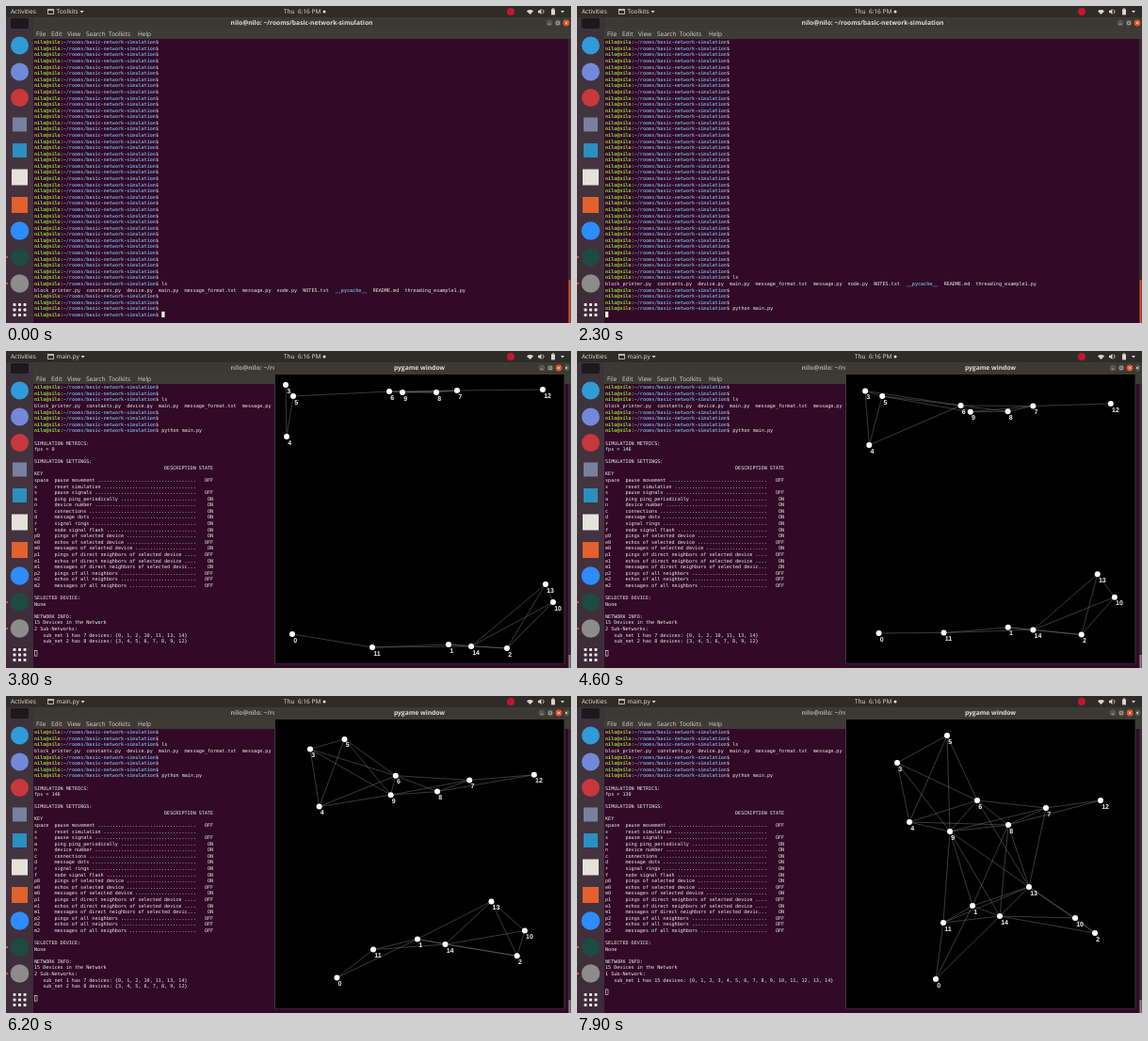
An HTML page with a canvas that plays this animation: 600 by 337 pixels, repeating every 8 s.

```html
<!DOCTYPE html>
<html lang="en">
<head>
<meta charset="utf-8">
<title>Network simulation</title>
<style>
  html, body { margin: 0; width: 100%; height: 100%; overflow: hidden; background: #300a24; }
  canvas { display: block; width: 600px; height: 337px; }
</style>
</head>
<body>
<canvas id="stage"></canvas>
<script>
const LOOP = 8000, WINDOW_AT = 3000, SIM_AT = 3300, ENTER_AT = 2100;
const canvas = document.getElementById('stage');
const ctx = canvas.getContext('2d');
const ratio = window.devicePixelRatio || 1;
canvas.width = 600 * ratio;
canvas.height = 337 * ratio;

const MONO = '"DejaVu Sans Mono", monospace';
const SANS = '"Open Sans", "Noto Sans", sans-serif';
const LABEL = 'bold 7px "Liberation Sans", sans-serif';
const COL = 3.074, ROW = 6.58, LEFT = 30, TOP = 38.4;
const WHITE = '#eeeeec', GREEN = '#8ae234', BLUE = '#729fcf';
const USER = 'nilo@nilo', PATH = '~/rooms/basic-network-simulation';

// Typed command: time and characters visible from then on
const COMMAND = 'python main.py';
const TYPING = [[300, 1], [400, 2], [500, 3], [600, 4], [700, 5], [800, 6], [900, 7],
  [1300, 8], [1400, 9], [1500, 10], [1600, 11], [1700, 14]];
const FPS = [[0, 0], [4300, 146], [6300, 130]];

const SETTINGS = [
  ['space', 'pause movement', 'OFF'], ['x', 'reset simulation', ''],
  ['s', 'pause signals', 'OFF'], ['a', 'ping ping_periodically', 'ON'],
  ['n', 'device number', 'ON'], ['c', 'connections', 'ON'],
  ['d', 'message dots', 'ON'], ['r', 'signal rings', 'ON'],
  ['f', 'node signal flash', 'ON'], ['p0', 'pings of selected device', 'ON'],
  ['e0', 'echos of selected device', 'OFF'], ['m0', 'messages of selected device', 'ON'],
  ['p1', 'pings of direct neighbors of selected device', 'OFF'],
  ['e1', 'echos of direct neighbors of selected device', 'ON'],
  ['m1', 'messages of direct neighbors of selected devic...', 'ON'],
  ['p2', 'pings of all neighbors', 'OFF'], ['e2', 'echos of all neighbors', 'OFF'],
  ['m2', 'messages of all neighbors', 'OFF']
];

// Device paths: x, y at each of the four times
const TIMES = [3800, 5300, 7000, 7900];
const PATHS = [
  [304, 301, 335, 299, 366, 300, 381, 301],
  [470, 312, 447, 278, 428, 241, 420, 223],
  [532, 316, 539, 289, 546, 265, 550, 252],
  [297, 36, 314, 48, 331, 64, 340, 71],
  [298, 91, 321, 108, 343, 126, 353, 134],
  [305, 48, 341, 48, 376, 44, 393, 42],
  [407, 43, 408, 71, 419, 97, 425, 111],
  [479, 42, 489, 73, 495, 104, 498, 119],
  [457, 44, 458, 82, 458, 119, 458, 137],
  [421, 44, 415, 83, 403, 125, 396, 144],
  [581, 267, 562, 257, 541, 243, 529, 236],
  [389, 315, 390, 286, 390, 255, 389, 241],
  [570, 41, 564, 69, 558, 97, 556, 111],
  [573, 248, 535, 228, 498, 210, 480, 203],
  [494, 314, 476, 281, 458, 249, 449, 234]
];
const RANGE = 108;

const stepAt = (table, t, start) => table.reduce((v, [at, next]) => t >= at ? next : v, start);

function rect(x, y, w, h, color) {
  ctx.fillStyle = color;
  ctx.fillRect(x, y, w, h);
}

function box(x, y, w, h, r, color) {
  ctx.fillStyle = color;
  ctx.beginPath();
  ctx.roundRect(x, y, w, h, r);
  ctx.fill();
}

function disc(x, y, r, color) {
  ctx.fillStyle = color;
  ctx.beginPath();
  ctx.arc(x, y, r, 0, Math.PI * 2);
  ctx.fill();
}

function poly(points, color) {
  ctx.fillStyle = color;
  ctx.beginPath();
  points.forEach(([x, y]) => ctx.lineTo(x, y));
  ctx.fill();
}

function line(points, color, width) {
  ctx.strokeStyle = color;
  ctx.lineWidth = width;
  ctx.beginPath();
  points.forEach(([x, y]) => ctx.lineTo(x, y));
  ctx.stroke();
}

function text(str, x, y, font, color, align = 'left') {
  ctx.font = font;
  ctx.fillStyle = color;
  ctx.textAlign = align;
  ctx.fillText(str, x, y);
}

// --- Devices ---

function devicesAt(t) {
  let k = 0;
  while (k < 2 && t > TIMES[k + 1]) k++;
  const f = (t - TIMES[k]) / (TIMES[k + 1] - TIMES[k]);
  const mix = (p, i) => p[i] + (p[i + 2] - p[i]) * f;
  return PATHS.map(p => [mix(p, 2 * k), mix(p, 2 * k + 1)]);
}

function linksOf(devices) {
  const links = [];
  devices.forEach((a, i) => devices.forEach((b, j) => {
    if (i < j && Math.hypot(a[0] - b[0], a[1] - b[1]) < RANGE) links.push([i, j]);
  }));
  return links;
}

function groupsOf(count, links) {
  const group = Array.from({ length: count }, (_, i) => i);
  links.forEach(([i, j]) => {
    const from = group[j], to = group[i];
    group.forEach((g, n) => { if (g === from) group[n] = to; });
  });
  return [...new Set(group)].map(g => [...group.keys()].filter(n => group[n] === g));
}

// --- Shell: each row is a list of [column, string, colour, weight] ---

const plain = str => [[0, str, WHITE, '']];
const prompt = (cmd = '') => [
  [0, USER, GREEN, 'bold '], [9, ':', WHITE, ''], [10, PATH, BLUE, 'bold '],
  [42, '$ ' + cmd, WHITE, '']
];
const FILES = 'block_printer.py  constants.py  device.py  main.py  message_format.txt  ' +
  'message.py  node.py  NOTES.txt  ';
const listing = [
  [0, FILES, WHITE, ''], [FILES.length, '__pycache__', BLUE, 'bold '],
  [FILES.length + 13, 'README.md  threading_example1.py', WHITE, '']
];
const HISTORY = [
  ...Array.from({ length: 39 }, () => prompt()), prompt('ls'), listing,
  prompt(), prompt(), prompt()
];

function report(t, groups) {
  const dotted = ([key, what, state]) =>
    key.padEnd(7) + (what.length < 49 ? what + ' ' : what).padEnd(49, '.') + state.padStart(6);
  return [
    '', 'SIMULATION METRICS:', 'fps = ' + stepAt(FPS, t, 0), '',
    'SIMULATION SETTINGS:', ' '.repeat(45) + 'DESCRIPTION STATE', 'KEY',
    ...SETTINGS.map(dotted), '',
    'SELECTED DEVICE:', 'None', '',
    'NETWORK INFO:', '15 Devices in the Network',
    groups.length + (groups.length > 1 ? ' Sub-Networks:' : ' Sub-Network:'),
    ...groups.map((g, i) => `   sub_net ${i + 1} has ${g.length} devices: {${g.join(', ')}}`),
    ''
  ].map(plain);
}

function drawShell(t, groups) {
  rect(29, 35, 571, 302, '#320a28');
  const typed = COMMAND.slice(0, stepAt(TYPING, t, 0));
  let rows = [...HISTORY, prompt(typed)];
  let column = 44 + typed.length, cursorRow = 44;
  if (t >= SIM_AT) {
    rows = [...rows.slice(37), ...report(t, groups)];
    cursorRow = rows.length;
    column = 0;
  } else if (t >= ENTER_AT) {
    rows = rows.slice(1);
    column = 0;
  }
  rows.forEach((row, i) => row.forEach(([col, str, color, weight]) =>
    text(str, LEFT + col * COL, TOP + i * ROW + 1.9, `${weight}5.1px ${MONO}`, color)));

  const x = LEFT + column * COL, y = TOP + cursorRow * ROW - 3.1;
  if (t >= WINDOW_AT) {
    ctx.strokeStyle = WHITE;
    ctx.lineWidth = 0.6;
    ctx.strokeRect(x + 0.3, y + 0.3, 2.7, 5.6);
  } else {
    rect(x, y, 3.3, 6.2, WHITE);
  }
  rect(597, 35, 3, 302, '#3a2733');
  if (t < SIM_AT) rect(597.5, 291, 2, 46, '#d4552a');
  else rect(597.5, 323, 2, 14, '#8d8788');
}

function drawButtons(x, close) {
  [0, 9, 18].forEach((dx, i) => disc(x + dx, 18, 3.4, i === 2 ? close : '#56534c'));
  line([[x - 1.4, 19.2], [x + 1.4, 19.2]], '#c9c5bb', 0.7);
  ctx.strokeStyle = '#c9c5bb';
  ctx.strokeRect(x + 7.7, 16.8, 2.6, 2.6);
  line([[x + 16.7, 16.7], [x + 19.3, 19.3]], '#eee', 0.7);
  line([[x + 19.3, 16.7], [x + 16.7, 19.3]], '#eee', 0.7);
}

function drawFrame(active) {
  rect(29, 12, 571, 12, '#3b3934');
  text(`${USER}: ${PATH}`, 314, 20.3, `bold 6.7px ${SANS}`, active ? '#dfdbd2' : '#aaa69d', 'center');
  drawButtons(577, active ? '#e2542a' : '#56534c');
  rect(29, 24, 571, 11, '#3d3b36');
  [['File', 32], ['Edit', 48], ['View', 65], ['Search', 85], ['Toolkits', 109], ['Help', 140]]
    .forEach(([name, x]) => text(name, x, 32.2, `6.5px ${SANS}`, '#d8d4cb'));
}

// --- Desktop ---

function drawTopBar(app) {
  rect(0, 0, 600, 12, '#2e2c28');
  const font = `6.5px ${SANS}`;
  text('Activities', 5, 8.4, font, '#e4e2dd');
  ctx.strokeStyle = '#d8d6d0';
  ctx.lineWidth = 0.8;
  ctx.strokeRect(44.4, 3.4, 6, 5);
  line([[44.4, 4.4], [50.4, 4.4]], '#d8d6d0', 0.9);
  text(app, 53.5, 8.4, font, '#e4e2dd');
  const end = 53.5 + ctx.measureText(app).width + 2;
  poly([[end, 5], [end + 4, 5], [end + 2, 7.4]], '#d8d6d0');
  text('Thu  6:16 PM', 295, 8.4, font, '#e4e2dd');
  disc(338, 6, 1.5, '#e4e2dd');

  disc(536, 6, 4, '#c4162e');
  ctx.fillStyle = '#d8d6d0';
  ctx.beginPath();
  ctx.moveTo(556.5, 9);
  ctx.arc(556.5, 9, 5, -Math.PI * 0.75, -Math.PI * 0.25);
  ctx.fill();
  poly([[565, 4.8], [566.5, 4.8], [568.5, 3], [568.5, 9], [566.5, 7.2], [565, 7.2]], '#d8d6d0');
  ctx.beginPath();
  ctx.arc(568.5, 6, 2.5, -1, 1);
  ctx.stroke();
  rect(579, 3.4, 4, 6, '#d8d6d0');
  rect(580, 2.4, 2, 1, '#d8d6d0');
  poly([[589, 5], [593, 5], [591, 7.4]], '#d8d6d0');
}

function drawDock() {
  const shade = ctx.createLinearGradient(0, 12, 0, 337);
  shade.addColorStop(0, '#3b333a');
  shade.addColorStop(0.5, '#45343f');
  shade.addColorStop(1, '#3d2a38');
  rect(0, 12, 29, 325, shade);
  box(5, 13, 19, 11, 2, '#1d191b');
  disc(14.5, 42, 9.5, '#2f9bd8');
  disc(14.5, 70, 9.5, '#7289da');
  disc(14.5, 97.5, 9.5, '#c8373c');
  box(7, 118.5, 15, 15, 0, '#77809f');
  box(7, 146, 15, 15, 0, '#2b8fc0');
  box(6, 173.5, 17, 17, 0, '#e5e2da');
  box(6, 203, 17, 17, 0, '#e2612c');
  disc(14.5, 239, 9.8, '#2d8cff');
  disc(14.5, 267, 9.8, '#1d4a43');
  disc(14.5, 295, 9.8, '#8c8c8a');
  [267, 295].forEach(y => disc(1, y, 1.2, '#d4552a'));
  for (let i = 0; i < 9; i++)
    box(7.5 + (i % 3) * 5.5, 316 + Math.floor(i / 3) * 5.5, 3, 3, 0.8, '#eeeae8');
}

function drawSimWindow(t, devices, links) {
  box(285, 12, 308.5, 320.5, [3, 3, 0, 0], '#3b3934');
  text('pygame window', 439, 20.3, `bold 6.7px ${SANS}`, '#dfdbd2', 'center');
  drawButtons(569, '#e2542a');
  rect(286, 25, 306.5, 307, '#000');
  if (t < SIM_AT) return;
  links.forEach(([i, j]) => line([devices[i], devices[j]], '#7a7070', 0.5));
  devices.forEach(([x, y], i) => {
    disc(x, y, 3, '#fff');
    text(i, x + 1.2, y + 8.6, LABEL, '#f2f2f2');
  });
}

function draw(t) {
  ctx.setTransform(ratio, 0, 0, ratio, 0, 0);
  ctx.textRendering = 'geometricPrecision';
  const devices = devicesAt(t), links = linksOf(devices);
  const open = t >= WINDOW_AT;
  drawShell(t, groupsOf(devices.length, links));
  drawFrame(!open);
  drawDock();
  drawTopBar(open ? 'main.py' : 'Toolkits');
  if (open) drawSimWindow(t, devices, links);
}

const start = performance.now();
function tick() {
  // The picture advances in steps of 100 ms
  const t = Math.max(0, performance.now() - start) % LOOP;
  draw(Math.floor(t / 100) * 100);
  requestAnimationFrame(tick);
}
tick();
</script>
</body>
</html>
```
